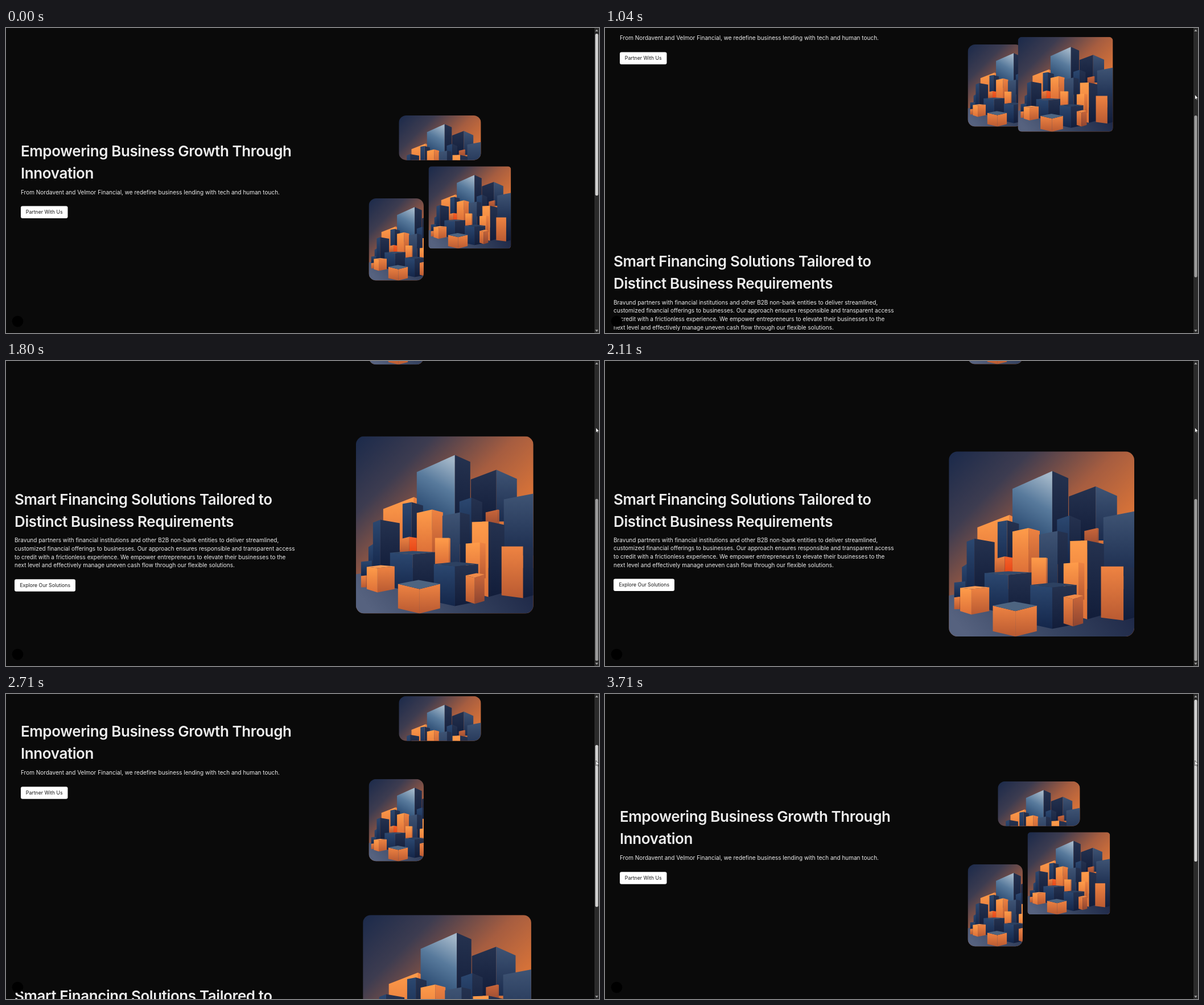
These frames come from a looping animation (1042x537 px, 3.79 s). An HTML page:

```html
<!DOCTYPE html>
<html lang="en">
<head>
<meta charset="utf-8">
<title>Business growth landing page</title>
<style>
  html, body { margin: 0; width: 100%; height: 100%; overflow: hidden; background: #0a0a0a; }
  svg { display: block; width: 100vw; height: 100vh; }
  text { font-family: Inter, "Open Sans", sans-serif; fill: #ededed; }
  .title { font-size: 26px; font-weight: 600; letter-spacing: -.4px; }
  .body { font-size: 10px; }
  .label { font-size: 8.7px; fill: #171717; text-anchor: middle; }
  .button { fill: #fff; }
</style>
</head>
<body>
<svg viewBox="0 0 1042 537">
  <defs>
    <linearGradient id="sky" gradientUnits="userSpaceOnUse" x1="10" y1="0" x2="220" y2="210">
      <stop offset="0" stop-color="#1d2b4b"/><stop offset=".3" stop-color="#3d3c50"/>
      <stop offset=".65" stop-color="#a65d40"/><stop offset="1" stop-color="#df7637"/>
    </linearGradient>
    <linearGradient id="floor" x1="0" y1=".5" x2="1" y2=".3">
      <stop offset="0" stop-color="#56627f"/><stop offset=".5" stop-color="#35425f"/><stop offset="1" stop-color="#1c2645"/>
    </linearGradient>
    <linearGradient id="glass" x1=".7" y1="0" x2=".4" y2="1">
      <stop offset="0" stop-color="#a3b7c9"/><stop offset=".4" stop-color="#587a9c"/><stop offset="1" stop-color="#1b3a63"/>
    </linearGradient>
    <clipPath id="wideClip"><rect width="312" height="170" rx="28"/></clipPath>
    <clipPath id="tallClip"><rect width="208" height="312" rx="28"/></clipPath>
    <clipPath id="heroClip"><rect id="heroMask" width="312" height="312"/></clipPath>
    <g id="art">
      <rect width="312" height="312" fill="url(#sky)"/>
      <path d="M0 243L60 232H312V312H0Z" fill="url(#floor)"/>
    </g>
  </defs>

  <g id="page">
    <text class="title" x="26" y="225.5">Empowering Business Growth Through</text>
    <text class="title" x="26" y="264.5">Innovation</text>
    <text class="body" x="26" y="292.5">From Nordavent and Velmor Financial, we redefine business lending with tech and human touch.</text>
    <rect class="button" x="26" y="313.5" width="82.5" height="21.5" rx="3"/>
    <text class="label" x="67.2" y="327.2">Partner With Us</text>

    <text class="title" x="15" y="691.5">Smart Financing Solutions Tailored to</text>
    <text class="title" x="15" y="730.5">Distinct Business Requirements</text>
    <text class="body">
      <tspan x="15" y="757.6">Bravund partners with financial institutions and other B2B non-bank entities to deliver streamlined,</tspan>
      <tspan x="15" y="772.3">customized financial offerings to businesses. Our approach ensures responsible and transparent access</tspan>
      <tspan x="15" y="786.9">to credit with a frictionless experience. We empower entrepreneurs to elevate their businesses to the</tspan>
      <tspan x="15" y="801.6">next level and effectively manage uneven cash flow through our flexible solutions.</tspan>
    </text>
    <rect class="button" x="15" y="822.5" width="107" height="21.5" rx="3"/>
    <text class="label" x="68.7" y="836.2">Explore Our Solutions</text>

    <g transform="translate(690.3 154) scale(.4625)" clip-path="url(#wideClip)"><use href="#art"/></g>
    <g transform="translate(637.5 300) scale(.4635)" clip-path="url(#tallClip)"><use href="#art"/></g>
    <g id="hero" clip-path="url(#heroClip)"><use href="#art"/></g>
  </g>

  <circle cx="20.5" cy="516.5" r="9.8" fill="#000"/>

  <rect x="1034" width="8" height="537" fill="#2b2b2b"/>
  <path d="M1035.3 6L1038 2.4L1040.7 6ZM1035.3 531.3L1038 535L1040.7 531.3Z" fill="#a0a0a0"/>
  <rect id="thumb" x="1035.4" width="5.2" height="285" rx="2.6"/>
  <path id="cursor" d="M1036.6 117.2V126L1038.6 124.2L1039.9 127L1041 126.4L1039.8 123.8H1042.3Z"
        fill="#fff" stroke="#111" stroke-width=".6"/>
</svg>

<script>
const $ = id => document.getElementById(id);
const SVG = 'http://www.w3.org/2000/svg';
const LOOP = 3790;

function add(parent, tag, attrs) {
  const el = document.createElementNS(SVG, tag);
  for (const name in attrs) el.setAttribute(name, attrs[name]);
  parent.append(el);
  return el;
}

// Vertical shades used for the block faces
function shade(id, top, bottom) {
  const g = add(document.querySelector('defs'), 'linearGradient', { id, x1: 0, y1: 0, x2: 0, y2: 1 });
  add(g, 'stop', { offset: 0, 'stop-color': top });
  add(g, 'stop', { offset: 1, 'stop-color': bottom });
}
shade('steel', '#3f5474', '#1b2c4e');
shade('blue', '#2c4870', '#14264a');
shade('navy', '#25324f', '#121d3a');
shade('amber', '#ff9c4a', '#dd7038');
shade('orange', '#ee8342', '#b95a32');
shade('rust', '#c9663a', '#8f4530');
shade('ember', '#f4622a', '#e84716');

// Two upright faces that meet at x = mid; the outer bottom corners may sit higher
function block(left, mid, right, yLeft, yMid, yRight, base, fillLeft, fillRight, lift = 0) {
  const face = (x, y, fill) => add($('art'), 'path', {
    d: `M${x} ${y}L${mid} ${yMid}V${base}L${x} ${base - lift}Z`, fill: `url(#${fill})`
  });
  face(left, yLeft, fillLeft);
  face(right, yRight, fillRight);
}
function lid(d, fill) { add($('art'), 'path', { d, fill }); }

block(48, 102, 108, 128, 107, 110, 200, 'amber', 'orange');
block(107, 174, 201, 63, 33, 45, 165, 'glass', 'navy');
block(202, 247, 283, 76, 59, 75, 150, 'navy', 'steel');
block(228, 250, 252, 134, 129, 130, 165, 'rust', 'rust');
block(182, 203, 222, 115, 108, 116, 190, 'blue', 'navy');
block(260, 312, 313, 111, 101, 101, 210, 'steel', 'navy');
block(82, 98, 118, 119, 116, 122, 205, 'blue', 'navy');
block(22, 33, 34, 195, 188, 189, 245, 'blue', 'navy');
block(30, 43, 77, 152, 147, 153, 238, 'blue', 'navy', 8);
block(107, 134, 153, 135, 129, 134, 205, 'amber', 'orange');
block(78, 94, 107, 181, 177, 179, 204, 'orange', 'ember');
block(152, 183, 200, 140, 134, 138, 240, 'steel', 'navy');
block(139, 164, 166, 179, 179, 180, 224, 'amber', 'orange');
block(9, 28, 30, 221, 219, 219, 246, 'blue', 'navy');
block(204, 233, 261, 151, 150, 156, 283, 'amber', 'navy', 8);
block(193, 218, 228, 189, 187, 189, 250, 'amber', 'orange');
block(256, 294, 312, 194, 194, 196, 285, 'orange', 'navy', 5);
block(60, 100, 139, 205, 208, 204, 275, 'blue', 'navy', 10);
lid('M60 205L100 202L139 204L100 208Z', '#354c6c');
block(137, 174, 215, 225, 229, 225, 299, 'blue', 'navy', 8);
lid('M137 225L176 221L215 225L174 229Z', '#2d4161');
block(193, 209, 226, 245, 249, 243, 295, 'orange', 'rust', 5);
lid('M193 245L212 241L226 243L209 249Z', '#f08a48');
block(9, 18, 21, 246, 245, 246, 266, 'orange', 'rust');
block(19, 38, 68, 230, 232, 229, 275, 'amber', 'orange', 6);
lid('M19 230L44 227L68 229L38 232Z', '#f79a55');
block(74, 112, 148, 260, 269, 260, 312, 'orange', 'orange', 9);
lid('M74 260L110 253L148 260L112 269Z', '#4d6480');

// The picture refreshes in bursts: [first, last, count]
const bursts = [[800, 1040, 9], [1060, 1280, 7], [1340, 1430, 3], [1490, 1800, 4], [1900, 2110, 4],
                [2400, 2440, 2], [2470, 2920, 8], [3030, 3090, 2], [3150, 3550, 6], [3650, 3710, 2]];
function snap(t) {
  let shown = 0;
  for (const [first, last, count] of bursts) {
    if (t < first) break;
    const gap = (last - first) / (count - 1);
    shown = first + gap * Math.min(count - 1, Math.floor((t - first) / gap + 1e-6));
  }
  return shown;
}

// Response of a smoothed scroller to a wheel ramp of the given length
function glide(t, ramp, tau) {
  if (t <= 0) return 0;
  const k = tau / ramp;
  return t < ramp ? t / ramp - k * (1 - Math.exp(-t / tau))
                  : 1 - k * (Math.exp(ramp / tau) - 1) * Math.exp(-t / tau);
}
function scrollAt(t) {
  return t < 2390 ? Math.min(439, 443 * glide(t - 780, 116, 210.6))
                  : 439 * (1 - glide(t - 2390, 190, 157));
}

// The hero picture trails the scroll position
const trail = [[770, 0], [1040, .122], [1430, .528], [1800, .923], [2110, 1], [2390, 1], [2440, .994],
               [2640, .86], [3090, .27], [3300, .08], [3550, .01], [3710, 0]];
function growthAt(t) {
  const i = trail.findIndex(([time]) => time > t) - 1;
  if (i < 0) return 0;
  const slope = j => {
    const a = trail[j - 1], b = trail[j + 1];
    return a && b ? (b[1] - a[1]) / (b[0] - a[0]) : 0;
  };
  const [t0, v0] = trail[i], [t1, v1] = trail[i + 1];
  const span = t1 - t0, u = (t - t0) / span, w = 1 - u;
  return v0 * w * w * (1 + 2 * u) + v1 * u * u * (1 + 2 * w)
       + span * u * w * (slope(i) * w - slope(i + 1) * u);
}

function draw() {
  const now = performance.now() % LOOP;
  const t = snap(now);
  const scroll = scrollAt(t), growth = growthAt(t);
  const grown = 181 * growth;
  const scale = (144.8 + grown) / 312;
  const thumbTop = 10 + scroll * .531;

  $('page').setAttribute('transform', `translate(0 ${-scroll})`);
  $('hero').setAttribute('transform',
    `translate(${742.5 - .764 * grown} ${243.5 + 1.96 * grown}) scale(${scale})`);
  $('heroMask').setAttribute('rx', (5.5 + 10 * growth) / scale);
  $('thumb').setAttribute('y', thumbTop);
  $('thumb').setAttribute('fill', thumbTop < 122 ? '#d2d2d2' : '#9d9d9d');
  $('cursor').setAttribute('visibility', now < 800 ? 'hidden' : 'visible');
  requestAnimationFrame(draw);
}
draw();
</script>
</body>
</html>
```
